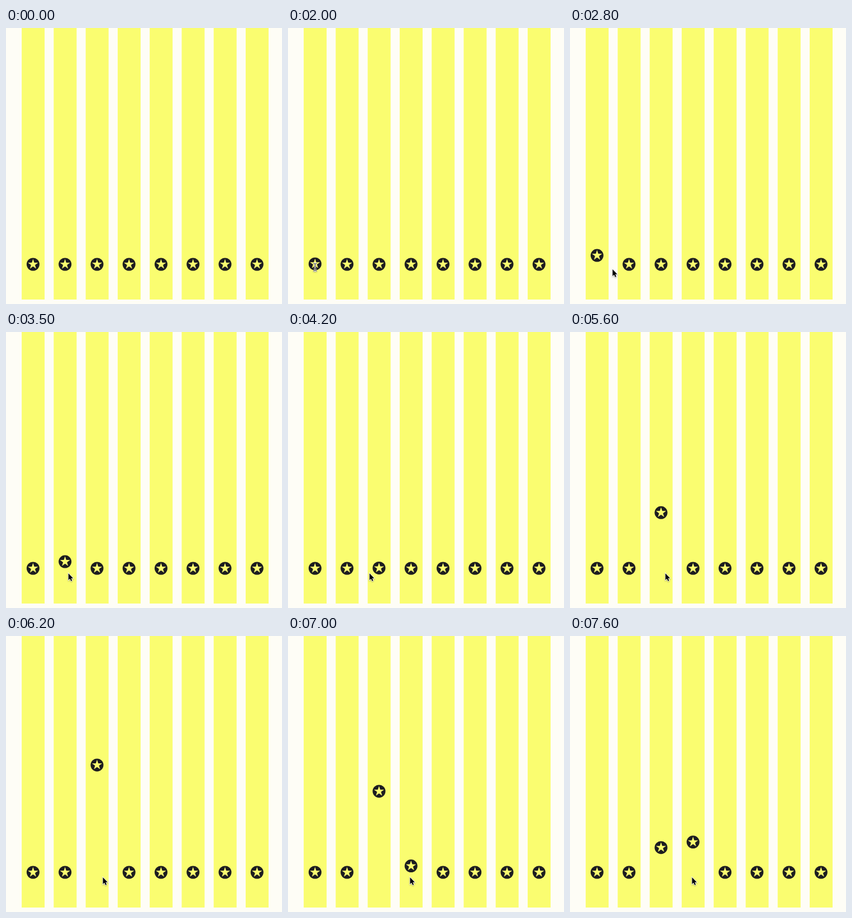
Write an HTML page that moves like this. It is 494 by 494 pixels and loops after 7700 ms.

```html
<!DOCTYPE html>
<html lang="en">
<head>
<meta charset="utf-8">
<title>Rising stars</title>
<style>
  html, body { margin: 0; width: 100%; height: 100%; overflow: hidden; background: #fefdf6; }
  svg { display: block; width: 100vw; height: 100vh; }
  #pointer { filter: drop-shadow(0 1px 1px rgba(0, 0, 0, .3)); }
</style>
</head>
<body>
<svg viewBox="0 0 494 494">
  <defs>
    <g id="badge"><circle r="11.5" fill="#1d1d20"/><path id="star" fill="#fafd70"/></g>
    <path id="bar" d="M-3 -7Q0 -7 0 -5Q0 -7 3 -7M0 -5V5M-3 7Q0 7 0 5Q0 7 3 7M-2 3H2"/>
  </defs>
  <g id="lanes"></g>
  <g id="pointer">
    <path id="arrow" d="M0 0V12L2.7 9.5L4.6 13.8L6.6 12.9L4.8 8.7H8.4Z"
          fill="#000" stroke="#fff" stroke-width="1.6" paint-order="stroke"/>
    <g id="beam" fill="none" transform="translate(0 -4)">
      <use href="#bar" stroke="#fff" stroke-width="2.8"/>
      <use href="#bar" stroke="#222"/>
    </g>
  </g>
</svg>
<script>
const LOOP = 7700, STEP = 100;
const LANES = 8, PITCH = 57.27, LANE_X = 28.1, LANE_WIDTH = 41, LANE_HEIGHT = 486;
const REST_Y = 423, TRAVEL = 518, RISE_MS = 5000;
const POINTER_IN = 1700, POINTER_Y = 432;

// When the pointer enters and leaves each of the first lanes.
const hovers = [[1855, 2675], [2960, 3800], [4080, 6268], [6472, LOOP]];

const laneLeft = lane => LANE_X + lane * PITCH;

// The pointer crosses lane edges at the hover times and lingers at a few stops (time, x).
const crossings = hovers.flatMap(([enter, leave], lane) =>
  [[enter, laneLeft(lane)], [leave, laneLeft(lane) + LANE_WIDTH]]).slice(1, -1);
const stops = [[POINTER_IN, 47], [2000, 48.5], [5000, 168], [6200, 173.5], [6900, 218.5], [LOOP, 218.5]];
const path = [...crossings, ...stops].sort((a, b) => a[0] - b[0]);

const $ = id => document.getElementById(id);
const lanes = $('lanes');

function add(tag, attributes) {
  const node = document.createElementNS('http://www.w3.org/2000/svg', tag);
  for (const name in attributes) node.setAttribute(name, attributes[name]);
  return lanes.appendChild(node);
}

const move = (node, x, y) => node.setAttribute('transform', `translate(${x} ${y})`);
const show = (node, visible) => node.style.display = visible ? '' : 'none';

$('star').setAttribute('d', 'M' + Array.from({ length: 10 }, (_, i) => {
  const angle = i * Math.PI / 5, radius = i % 2 ? 3.7 : 9.5;
  return [radius * Math.sin(angle), -radius * Math.cos(angle)].map(v => v.toFixed(2));
}).join('L') + 'Z');

const badges = Array.from({ length: LANES }, (_, lane) => {
  add('rect', { x: laneLeft(lane), width: LANE_WIDTH, height: LANE_HEIGHT, fill: '#fafd70' });
  return add('use', { href: '#badge' });
});

// cubic-bezier(.42, 0, .58, 1)
function easeInOut(x) {
  if (x <= 0) return 0;
  if (x >= 1) return 1;
  let low = 0, high = 1, u;
  for (let i = 0; i < 24; i++) {
    u = (low + high) / 2;
    const value = 1.26 * u * (1 - u) ** 2 + 1.74 * u * u * (1 - u) + u ** 3;
    if (value < x) low = u; else high = u;
  }
  return u * u * (3 - 2 * u);
}

// A return takes time in proportion to the share of the rise already made.
function lift(t, [enter, leave]) {
  const share = easeInOut((Math.min(t, leave) - enter) / RISE_MS);
  const fall = t > leave ? easeInOut((t - leave) / (share * RISE_MS)) : 0;
  return TRAVEL * share * (1 - fall);
}

function pointerX(t) {
  const next = Math.max(1, path.findIndex(([time]) => time > t));
  const [t0, x0] = path[next - 1], [t1, x1] = path[next];
  return x0 + (x1 - x0) * (t - t0) / (t1 - t0);
}

function draw(t) {
  badges.forEach((badge, lane) => {
    const up = hovers[lane] ? lift(t, hovers[lane]) : 0;
    move(badge, laneLeft(lane) + 20.3, REST_Y - up);
  });
  const overText = t > 1930 && t < 2250;
  show($('pointer'), t >= POINTER_IN);
  show($('arrow'), !overText);
  show($('beam'), overText);
  move($('pointer'), pointerX(t), POINTER_Y + Math.max(0, 2000 - t) / 10);
}

const start = performance.now();
function tick() {
  const t = (performance.now() - start) % LOOP;
  draw(Math.floor(t / STEP) * STEP);
  requestAnimationFrame(tick);
}
tick();
</script>
</body>
</html>
```
